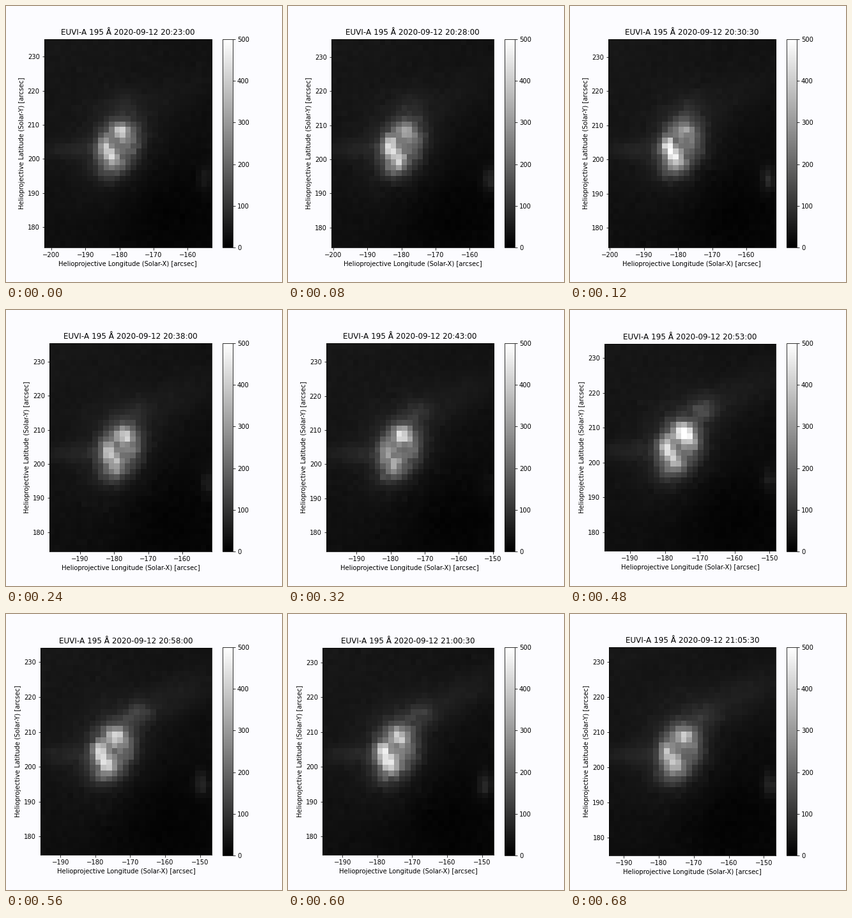
Recreate the animation shown at these times as a matplotlib script. Size 432 by 432 pixels, loop 0.72 s.

```python
import math

import matplotlib.pyplot as plt
import numpy as np
from matplotlib.animation import FuncAnimation
from matplotlib.ticker import MultipleLocator

SIZE, FRAMES, INTERVAL = 432, 18, 40
CELL = 1.588                             # detector cell in arcsec
LEFT, RIGHT, BOTTOM = -202.1, -153.0, 174.06
MARGIN = 0.23                            # part of a cell above and below
BOX_RIGHT, BOX_MID, BOX_W, BOX_H = 321.84, 217.08, 267.84, 326.16
PAPER = "#fcfcff"

GRAIN = np.random.default_rng(7).normal(size=(42, 42))


def bump(n, peak, width):
    return math.exp(-(((n - peak) / width) ** 2))


def swing(n, peak, period):
    return math.cos(2 * math.pi * (n - peak) / period)


def blob(u, v, cu, cv, su, sv, tilt=0.0, power=1.0):
    c, s = math.cos(tilt), math.sin(tilt)
    a = ((u - cu) * c + (v - cv) * s) / su
    b = ((v - cv) * c - (u - cu) * s) / sv
    return np.exp(-0.5 * (a * a + b * b) ** power)


def window(n):
    """Limits of the cut-out; each edge follows the Sun in whole cells."""
    x0 = LEFT + CELL * math.floor(0.27 * n + 0.55)
    x1 = RIGHT + CELL * math.floor(0.27 * n + 0.24)
    y0 = BOTTOM + 0.045 * n
    rows = 38 if n < 11 else 37
    return x0, x1, y0, rows


def corona(n, x0, y0, cols, rows):
    """Counts per cell, in coordinates that move with the loops."""
    u, v = np.meshgrid(x0 + CELL * (np.arange(cols) + 0.5),
                       y0 + CELL * (np.arange(rows) + 0.5))
    u = u + 181 - 0.39 * n
    v = v - 203 - 0.045 * n

    top = 190 + 230 * bump(n, 10, 1.8) - 90 * bump(n, 3, 1.8)
    side = 35 + 170 * bump(n, 12, 1.7) + 60 * bump(n, 6, 1.7)
    left = 200 + 80 * swing(n, 3, 10.5)
    low = 175 + 75 * swing(n, 3, 11.5)
    plume = 20 + 70 * bump(n, 12, 3.5)
    spot = 38 + 26 * swing(n, 3, 12)

    sky = 33 + 0.3 * v - 0.25 * u - 16 * blob(u, v, 14, -18, 11, 11)
    sky += (10 + n) * blob(u, v, 17, 16, 12, 4, 0.45)
    sky += 28 * blob(u, v, -13, -0.3, 7, 2)
    body = 120 * blob(u, v, 0.4, 1.0, 5.6, 7.6, -0.35, 2)
    body += 45 * blob(u, v, 0, 1, 7.2, 9.5, -0.3)
    body += 45 * blob(u, v, -3.2, -6.5, 2.4, 2)
    body += top * blob(u, v, 1.2, 5.2, 2, 1.8, 0, 1.3)
    body += side * blob(u, v, 3.3, 2.8, 1.7, 2.2)
    body += left * blob(u, v, -3.2, 0.6, 1.3, 1.9)
    body += low * blob(u, v, -1, -3, 1.5, 2, 0.3)
    body += plume * blob(u, v, min(2.5 + 0.4 * n, 7.8), 13 - 0.1 * n, 2.6, 2.2)
    body += spot * blob(u, v, 26, -8.8, 1.4, 2.4)

    grain = np.roll(GRAIN, (n * 3, n * 7), (0, 1))[:rows, :cols]
    return np.clip(sky + 2 * grain + body * (1 + 0.08 * grain), 0, None)


def px_rect(x, y, w, h):
    return [x / SIZE, y / SIZE, w / SIZE, h / SIZE]


fig = plt.figure(figsize=(6, 6), dpi=72, facecolor=PAPER)
ax = fig.add_axes(px_rect(60, 54, 262, BOX_H))
im = ax.imshow(np.zeros((2, 2)), cmap="gray", vmin=0, vmax=500,
               origin="lower", interpolation="nearest", aspect="auto")
ax.xaxis.set_major_locator(MultipleLocator(10))
ax.yaxis.set_major_locator(MultipleLocator(10))
ax.set_xlabel("Helioprojective Longitude (Solar-X) [arcsec]")
ax.set_ylabel("Helioprojective Latitude (Solar-Y) [arcsec]")
title = ax.set_title("", pad=7)
cax = fig.add_axes(px_rect(338.58, 54, BOX_H / 20, BOX_H))
fig.colorbar(im, cax=cax)


def update(n):
    x0, x1, y0, rows = window(n)
    width, height = x1 - x0, (rows + 2 * MARGIN) * CELL
    scale = min(BOX_H / height, BOX_W / width)
    w, h = width * scale, height * scale
    ax.set_position(px_rect(BOX_RIGHT - w, BOX_MID - h / 2, w, h))

    # The outer cells are cut off by the frame.
    cols, rows = math.ceil(width / CELL) + 1, rows + 2
    gx, gy = x0 - 0.1 * CELL, y0 - (1 - MARGIN) * CELL
    im.set_data(corona(n, gx, gy, cols, rows))
    im.set_extent((gx, gx + cols * CELL, gy, gy + rows * CELL))
    ax.set_xlim(x0, x1)
    ax.set_ylim(y0, y0 + height)

    clock = 20 * 3600 + 23 * 60 + 150 * n
    stamp = f"{clock // 3600}:{clock // 60 % 60:02d}:{clock % 60:02d}"
    title.set_text(f"EUVI-A 195 Å 2020-09-12 {stamp}")
    return im, title


anim = FuncAnimation(fig, update, frames=FRAMES, interval=INTERVAL,
                     repeat=True, repeat_delay=0, blit=False)
plt.show()
```
